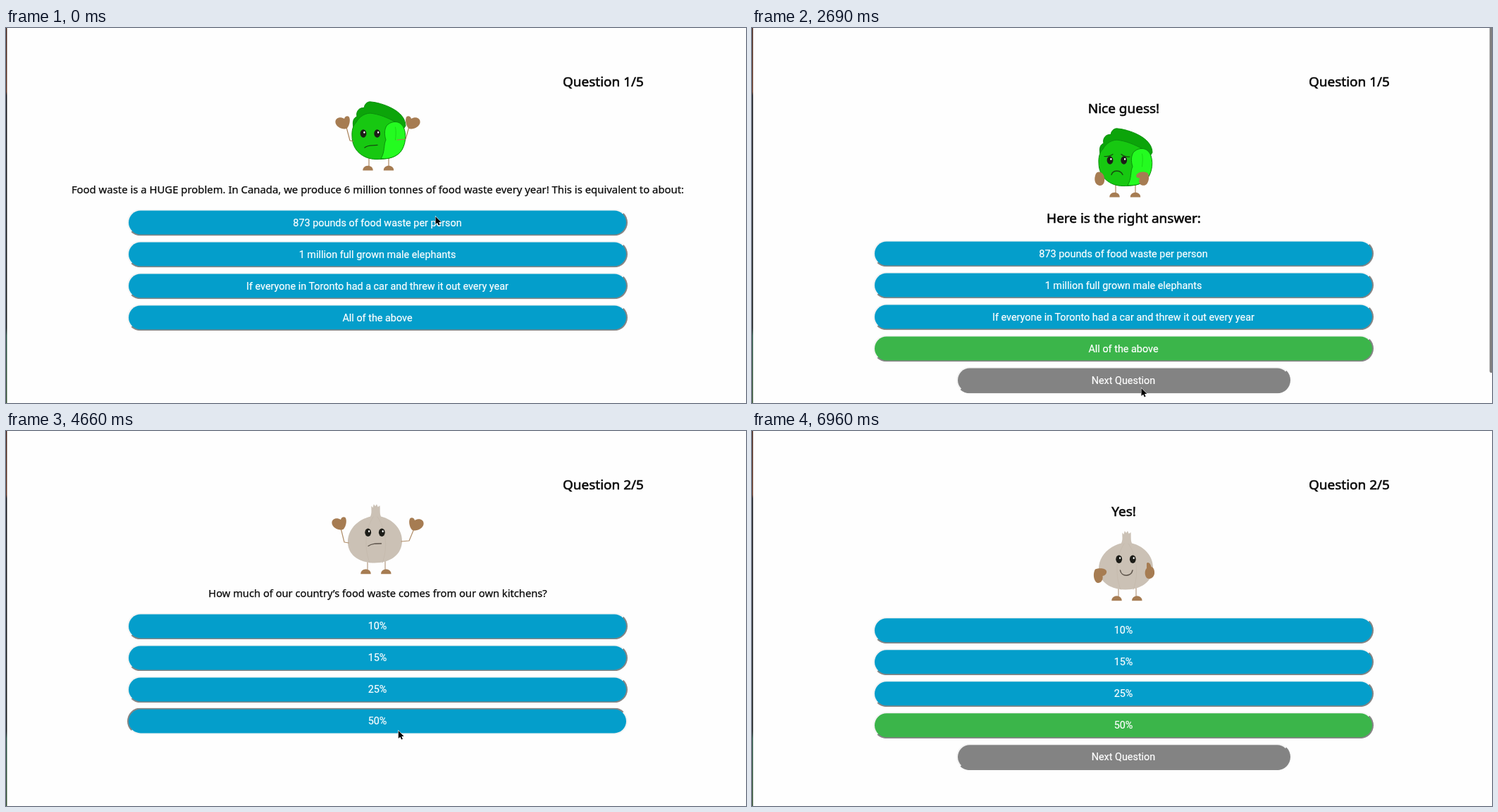
An HTML page that plays this animation: 1050 px wide and 533 px high, repeating every 7060 ms.

```html
<!DOCTYPE html>
<html lang="en">
<head>
<meta charset="utf-8">
<title>Food waste quiz</title>
<style>
  html, body { margin: 0; width: 100%; height: 100%; overflow: hidden; background: #fefefe; }
  #stage { position: relative; width: 1050px; height: 533px; overflow: hidden; }
  #stage > svg { position: absolute; left: 0; top: 0; }
  .pill {
    position: absolute; top: 0; left: 172px; width: 710px; height: 38px; padding-top: 1px; box-sizing: border-box;
    display: flex; align-items: center; justify-content: center;
    border: 2px solid; border-color: #f4f4f4 #858585 #858585 #f4f4f4; border-radius: 19px;
    background: #049ecb; color: #fff; font: 14.4px Roboto, sans-serif; white-space: nowrap;
    -webkit-text-stroke: .2px #fff;
  }
  .pill.pressed { border-color: #858585 #f4f4f4 #f4f4f4 #858585; }
  .pill.right { background: #3bb54a; }
  .pill.next { left: 290px; width: 474px; background: #838383; }
  text { font-family: "Noto Sans", sans-serif; text-anchor: middle; fill: #0a0a0a; stroke: #0a0a0a; stroke-width: .25; }
  .head { font-size: 18.98px; stroke-width: .6; }
  .line { fill: none; stroke-linecap: round; stroke-linejoin: round; }
</style>
</head>
<body>
<div id="stage">
  <svg id="art" width="1050" height="533" viewBox="0 0 1050 533">
    <defs>
      <linearGradient id="edge" x1="0" y1="0" x2="0" y2="1">
        <stop offset="0" stop-color="#3c1a10"/>
        <stop offset=".17" stop-color="#5a2a18"/>
        <stop offset=".18" stop-color="#0b0b10"/>
        <stop offset=".8" stop-color="#0d1212"/>
        <stop offset=".82" stop-color="#1f4a3c"/>
        <stop offset="1" stop-color="#2c4a2a"/>
      </linearGradient>
    </defs>
    <rect width="1.4" height="533" fill="url(#edge)"/>
    <text id="count" class="head" x="847.5" y="83"></text>
    <g id="scene"></g>
    <rect id="bar" x="1046.6" y="-4" width="5" rx="2" fill="#7f7f7f"/>
  </svg>
  <div id="pills"></div>
  <svg width="1050" height="533" viewBox="0 0 1050 533">
    <path id="cursor" d="M0 0V11L2.6 8.8 4.3 12.6 6.1 11.8 4.5 8.1H7.8Z" fill="#000" stroke="#fff" stroke-width="1.1" paint-order="stroke"/>
  </svg>
</div>
<script>
const LOOP = 7060;
const BROWN = '#a67c52';
const $ = id => document.getElementById(id);

const fill = (d, color, extra = '') => `<path d="${d}" fill="${color}" ${extra}/>`;
const line = (d, color, width = 1.2) => `<path class="line" d="${d}" stroke="${color}" stroke-width="${width}"/>`;
const move = (x, y, body) => `<g transform="translate(${x} ${y})">${body}</g>`;
const label = (s, y, size) => `<text x="527.5" y="${y}" style="font-size:${size}px">${s}</text>`;
const head = (s, y) => `<text class="head" x="527.5" y="${y}">${s}</text>`;

const eye = (x, y) =>
  `<ellipse cx="${x}" cy="${y}" rx="4.4" ry="5.7" fill="#1d1d18"/>` +
  `<ellipse cx="${x + 1.4}" cy="${y - 1.8}" rx="1.1" ry="1.5" fill="#fff"/>`;
const shoe = (x, y) => fill(`M${x - 7.2} ${y}C${x - 7.5} ${y - 9} ${x + 7.5} ${y - 9} ${x + 7.2} ${y}Z`, BROWN);

const mitt = fill('M484 142.500C479 145.500 468 141 467.400 134C467 127 475 125.500 480 129C480.500 126 484 124 486.500 126C489 129 488 138 484 142.500Z', BROWN);
const mittMirror = `<g transform="matrix(-1 0 0 1 1055 0)">${mitt}</g>`;

// Cabbage
const edge = 'stroke="#0b8f0b" stroke-width="1"';
const cabbageBody =
  line('M515 184V198M543 184V198', BROWN, 1.1) + shoe(513.5, 202.5) + shoe(543, 202.5) +
  fill('M493 141C491 132 494 127 498 126C496 118 502 112.500 508 113.500C509 107 514 104 518 105C532 106 567 117 567 139L560 150L500 150Z', '#0ca40a', edge) +
  fill('M497 134C501 126 511 119.500 520 121.500C535 124 546 130 559 137C567 145 568 162 561 174C553 186 537 186.500 525 186.500C507 186.500 491 174 491 154C490.500 146 492 139 497 134Z', '#17c811', edge) +
  fill('M540 139C545 133 555 131 561 137C568.500 144 568.500 162 562 173C556 183 543 187 532 185.500C538 176 535.500 166 539 159C536.500 151 537 144 540 139Z', '#24fb20', edge) +
  line('M552.500 141C554 147 553 153 552.500 159', '#18d414', .9) +
  eye(507, 150) + eye(526.7, 150);

const cabbageShrug = cabbageBody +
  line('M509 170C514 165.500 520 167.500 527 166.300', '#174a10', 1.3) +
  line('M483 141L488 160L493 161M572 140L567 158L555 159', BROWN, 1.1) +
  mitt + mittMirror;

const cabbageSad = move(1, 38, cabbageBody +
  line('M499 144.500C504 145 508 143.500 511 141.500M523 141.500C526 144 530 145.500 535 145', '#174a10', 1.2) +
  line('M509 170.500C511 163.500 522 163.500 525 170.500', '#174a10', 1.4) +
  fill('M489 167C494 165 498 169 499 175C500 182 497 186.500 492 186C486 185 484 178 486 172C486.500 170 487 168 489 167Z', BROWN) +
  fill('M545 170C548 166 556 165.500 560 168C563.500 171 562.500 180 559 184C555 187.500 549 186 548 180C548.500 178 549 176 549 175C546 176 542.500 173 545 170Z', BROWN));

// Garlic
const garlicBody =
  line('M513 184V198M538 184V198', '#b49a82', 1.2) + shoe(510.5, 203.3) + shoe(539.3, 203.3) +
  fill('M517 121.500C519.500 116 518 112 518.500 106.500L520.500 109L521.800 104L524 107L526 104L527.700 108L530.500 106C531 112 530 117 532 121.500C550 126 562 140 562 156C562 176 545 187.500 523 187.500C501 187.500 485 176 485 158C485 140 499 126 517 121.500Z', '#cbc1b5') +
  line('M521 122C508 142 509 170 516 187M527 122C541 142 541 170 534 187', '#c6bbae', 1) +
  eye(513.7, 144.3) + eye(533.3, 144.3);

const garlicShrug = garlicBody +
  line('M514 163.500C519 160 525 160 532.500 160', '#5a5148', 1.3) +
  line('M475 138L480 158L486 159M579 139L572 156L561 157', '#b08d68', 1.2) +
  move(-5, -3, mitt) + move(5, -2, mittMirror);

const garlicHappy = move(7, 38, garlicBody +
  line('M515.500 160C517 169.500 531 169.500 533 160', '#5a5148', 1.5) +
  fill('M480 158.500C486 156 495 157 496 161C497 165 493 168 490.500 168C491.500 174 488 178 484 178C478 177 476 165 480 158.500Z', BROWN) +
  fill('M553 150C555 147.500 558.500 150 559.500 155C563 156 564.500 160 564 165C563 170 559 173 554 171.500C550 169 549.500 160 553 157Z', BROWN));

const quiz1 = ['873 pounds of food waste per person', '1 million full grown male elephants',
  'If everyone in Toronto had a car and threw it out every year', 'All of the above'];
const quiz2 = ['10%', '15%', '25%', '50%'];

const scenes = [
  { at: 0, n: 1, top: 257.5, options: quiz1, art: cabbageShrug +
      label('Food waste is a HUGE problem. In Canada, we produce 6 million tonnes of food waste every year! This is equivalent to about:', 235, 14.88) },
  { at: 1540, n: 1, top: 301.5, options: quiz1, bar: 490, art: cabbageSad +
      head('Nice guess!', 121) + head('Here is the right answer:', 277) },
  { at: 2990, n: 2, top: 258.4, options: quiz2, art: garlicShrug +
      label('How much of our country’s food waste comes from our own kitchens?', 236, 14.7) },
  { at: 4810, n: 2, top: 264.2, options: quiz2, bar: 526, art: garlicHappy + head('Yes!', 121) }
];

// Pointer trips: held positions sampled in a few steps
const trips = [
  { from: 140, to: 640, steps: 4, a: [609.5, 268], b: [558.5, 324] },
  { from: 1990, to: 2690, steps: 5, a: [558.5, 324], b: [552.5, 512] },
  { from: 3590, to: 4360, steps: 6, a: [552.5, 512], b: [556.8, 426] },
  { from: 5110, to: 5910, steps: 6, a: [556.8, 426], b: [838, 536] }
];

const pills = Array.from({ length: 5 }, () => $('pills').appendChild(document.createElement('div')));
let shown = null;

function pointer(t) {
  let pos = trips[0].a;
  for (const { from, to, steps, a, b } of trips) {
    if (t < from) break;
    const k = Math.min(steps, 1 + Math.floor((t - from) / (to - from) * (steps - 1) + 1e-6)) / steps;
    const p = k * k * (3 - 2 * k);
    pos = a.map((v, i) => v + (b[i] - v) * p);
  }
  return pos;
}

function show(scene) {
  shown = scene;
  $('count').textContent = `Question ${scene.n}/5`;
  $('scene').innerHTML = scene.art;
  pills.forEach((pill, i) => {
    pill.textContent = scene.options[i] || 'Next Question';
    pill.style.transform = `translateY(${scene.top + 45 * i}px)`;
    pill.style.display = i === 4 && !scene.bar ? 'none' : '';
  });
  $('bar').setAttribute('height', scene.bar ? scene.bar + 4 : 0);
}

function draw(t) {
  const scene = scenes.filter(s => s.at <= t).pop();
  if (scene !== shown) show(scene);
  const pressed = t >= 1390 && t < 1540 ? 1 : t >= 4660 && t < 4810 ? 3 : -1;
  pills.forEach((pill, i) => {
    pill.className = 'pill' + (i === 4 ? ' next' : i === 3 && scene.bar ? ' right' : '') +
      (i === pressed ? ' pressed' : '');
  });
  $('bar').setAttribute('opacity', t < 6500 ? 1 : t < 6640 ? .5 : 0);
  $('cursor').setAttribute('transform', `translate(${pointer(t)})`);
}

const start = performance.now();
function tick() {
  draw((performance.now() - start) % LOOP);
  requestAnimationFrame(tick);
}
tick();
</script>
</body>
</html>
```
